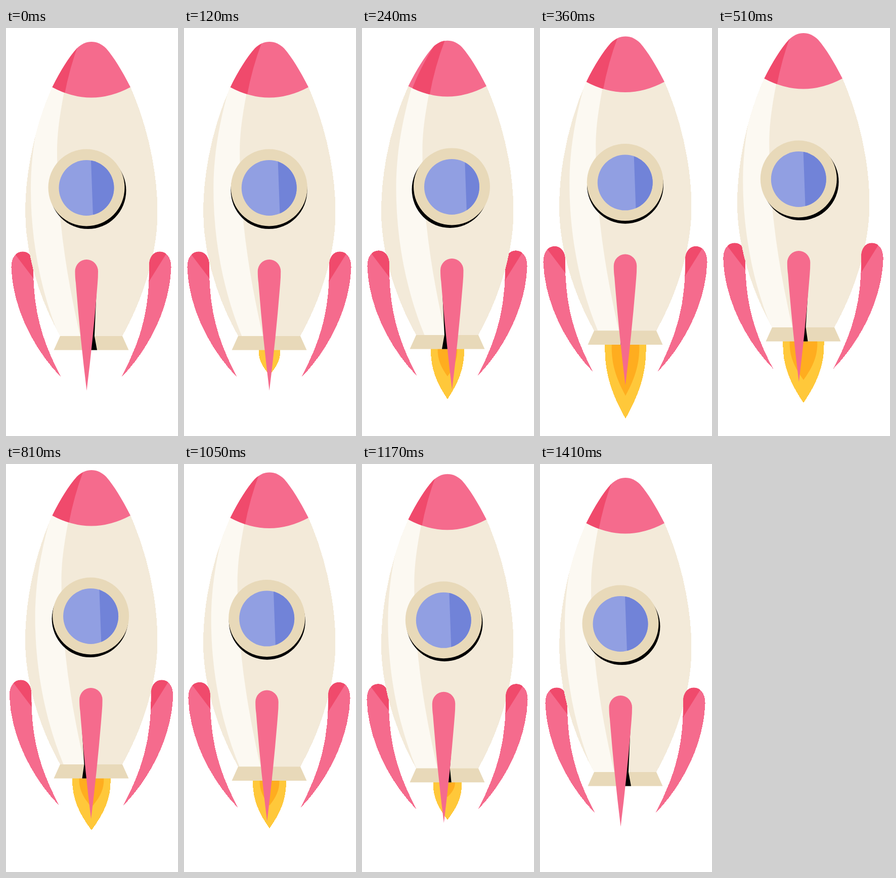
An HTML page that plays this animation: 340 by 800 pixels, repeating every 1.44 s.

```html
<!DOCTYPE html>
<html lang="en">
<head>
<meta charset="utf-8">
<title>Rocket</title>
<style>
html, body { margin: 0; width: 100%; height: 100%; overflow: hidden; background: #fff; }
svg { display: block; width: 340px; height: 800px; }
.crisp { shape-rendering: crispEdges; }
</style>
</head>
<body>
<svg viewBox="0 0 340 800">
  <defs>
    <path id="hull" d="M91.5 116C60 185 38 275 38 362C38 445 68 535 107 604H230C269 535 299.5 445 299.5 362C299.5 275 277 185 246 116Z"/>
    <path id="nose" d="M91.5 116C108 83 124 58 140 40C157 22.5 181 22.5 198 40C213 57 229 83 246 116Q168.5 157 91.5 116Z"/>
    <path id="blade" d="M10.5 470C10 450 20 438.5 33 438.5C46 438.5 54 450 54 465C53 560 74 618 109 685C52 627 13 545 10.5 470Z"/>
    <clipPath id="inHull"><use href="#hull"/></clipPath>
    <clipPath id="inNose"><use href="#nose"/></clipPath>
    <clipPath id="inBlade"><use href="#blade"/></clipPath>
    <clipPath id="inGlass"><circle cx="159" cy="313.5" r="54.5"/></clipPath>
  </defs>
  <g id="rocket">
    <path id="flame" class="crisp" fill="#ffc83a"/>
    <path id="core" fill="#ffad1f"/>
    <g id="back"></g>
    <g id="body">
      <use href="#hull" class="crisp" fill="#f3ead9"/>
      <g clip-path="url(#inHull)">
        <path class="turn" fill="#fcf9f2" d="M82 110C60 185 49 250 49 315C49 420 70 520 105 604L148 610C120 490 101 370 101 245C101 205 106 170 118 110Z"/>
      </g>
      <use href="#nose" fill="#f56b8d"/>
      <g clip-path="url(#inNose)">
        <path class="turn" fill="#f04a6c" d="M147 22Q126 75 115 134L79 126Q95 82 128 30Z"/>
      </g>
      <path d="M107 604H230L242.5 631.5H94.5Z" fill="#e8d9b9"/>
      <circle id="ringShade" cx="162" cy="318.6" r="75.5"/>
      <g class="turn">
        <circle cx="159" cy="313" r="75.5" fill="#e8d9b9"/>
        <circle cx="159" cy="313.5" r="54.5" fill="#919fe2"/>
        <g clip-path="url(#inGlass)">
          <path id="glint" d="M168 259L172 368H240V259Z" fill="#7183d8"/>
        </g>
      </g>
    </g>
    <g id="left">
      <use href="#blade" class="crisp" fill="#f56b8d"/>
      <path d="M19 445L55 492L70 480V430H19Z" fill="#f04a6c" clip-path="url(#inBlade)"/>
    </g>
    <g id="right">
      <use href="#blade" class="crisp" fill="#f56b8d"/>
      <path d="M21 444L55 498L70 480V430H21Z" fill="#f04a6c" clip-path="url(#inBlade)"/>
    </g>
    <path id="finShade"/>
    <path class="turn" fill="#f56b8d" d="M136.5 477A22.75 23 0 0 1 182 477Q182 490 181 500Q172.7 605 159.5 711Q146.3 605 138 500Q136.5 490 136.5 477Z"/>
  </g>
</svg>
<script>
const LOOP = 1440, STEP = 30;
const $ = id => document.getElementById(id);
const rocket = $('rocket'), body = $('body'), back = $('back');
const left = $('left'), right = $('right');
const turning = document.querySelectorAll('.turn');

const linear = u => u;
const sine = u => (1 - Math.cos(Math.PI * u)) / 2;
const quadIn = u => u * u;

// The rocket turns twice: a wide quick swing, then a smaller slow one.
const swing = (rest, wide, back, small) =>
  [[0, rest], [240, wide, sine], [480, back, sine], [720, small, sine], [1400, rest, sine]];
const TURN = swing(0, 18.5, 0, 9);
const RING_SHADE = swing(0, 12, 1, 4.3);
const FIN_SHADE = swing(12, -11.5, 10, -10);

// Each key is [time, value, easing towards it].
const LIFT = [[0, 0], [160, 0], [510, -17, sine], [1380, 0, quadIn]];
const LENGTH = [[0, 0], [240, 99], [390, 157], [510, 121], [540, 116], [810, 102], [1050, 94], [1080, 93], [1170, 74], [1400, 0]];
const WIDTH = [[0, 20], [240, 66], [390, 86], [510, 82], [810, 76], [1050, 66], [1170, 57], [1400, 20]];

function track(keys, t) {
  for (let i = 1; i < keys.length; i++) {
    const [t0, v0] = keys[i - 1], [t1, v1, ease = linear] = keys[i];
    if (t <= t1) return v0 + (v1 - v0) * ease((t - t0) / (t1 - t0));
  }
  return keys[keys.length - 1][1];
}

const shift = (el, x, y = 0) => el.setAttribute('transform', `translate(${x} ${y})`);

function drop(w, len) {
  if (w <= 0 || len <= 0) return '';
  const x = k => 169 + k * w, y = k => 631 + k * len;
  return `M${x(-.495)} ${y(0)}C${x(-.52)} ${y(.4)} ${x(-.3)} ${y(.7)} 169 ${y(1)}` +
    `C${x(.3)} ${y(.7)} ${x(.52)} ${y(.4)} ${x(.495)} ${y(0)}Z`;
}

function place(el, behind) {
  const parent = behind ? back : rocket;
  if (el.parentNode === parent) return;
  if (behind) back.append(el);
  else body.after(el);
}

function draw(t) {
  const x = track(TURN, t);
  const len = track(LENGTH, t), w = track(WIDTH, t);
  shift(rocket, 0, track(LIFT, t));
  turning.forEach(el => shift(el, x));
  shift($('glint'), x * .9);
  shift($('ringShade'), track(RING_SHADE, t));

  // Side fins stand out most when the rocket is halfway through its turn.
  const out = 4 * (1 - Math.abs(x - 9.25) / 9.25);
  shift(left, -out);
  right.setAttribute('transform', `translate(${337 + out} 0) scale(-1 1)`);
  place(left, x < 3);
  place(right, x > 15.5);

  const c = track(FIN_SHADE, t), m = 159.5 + x, mid = m + c * .6, low = m + c;
  $('finShade').setAttribute('d', `M${m - 20} 500L${mid - 8.2} 604L${low - 8.5} 631.5` +
    `H${low + 8.5}L${mid + 8.2} 604L${m + 20} 500Z`);

  $('flame').setAttribute('d', drop(w, len));
  $('core').setAttribute('d', drop(w - 27, len - 45));
}

const start = performance.now();
function tick() {
  const t = (performance.now() - start) % LOOP;
  draw(Math.floor(t / STEP) * STEP);
  requestAnimationFrame(tick);
}
tick();
</script>
</body>
</html>
```
